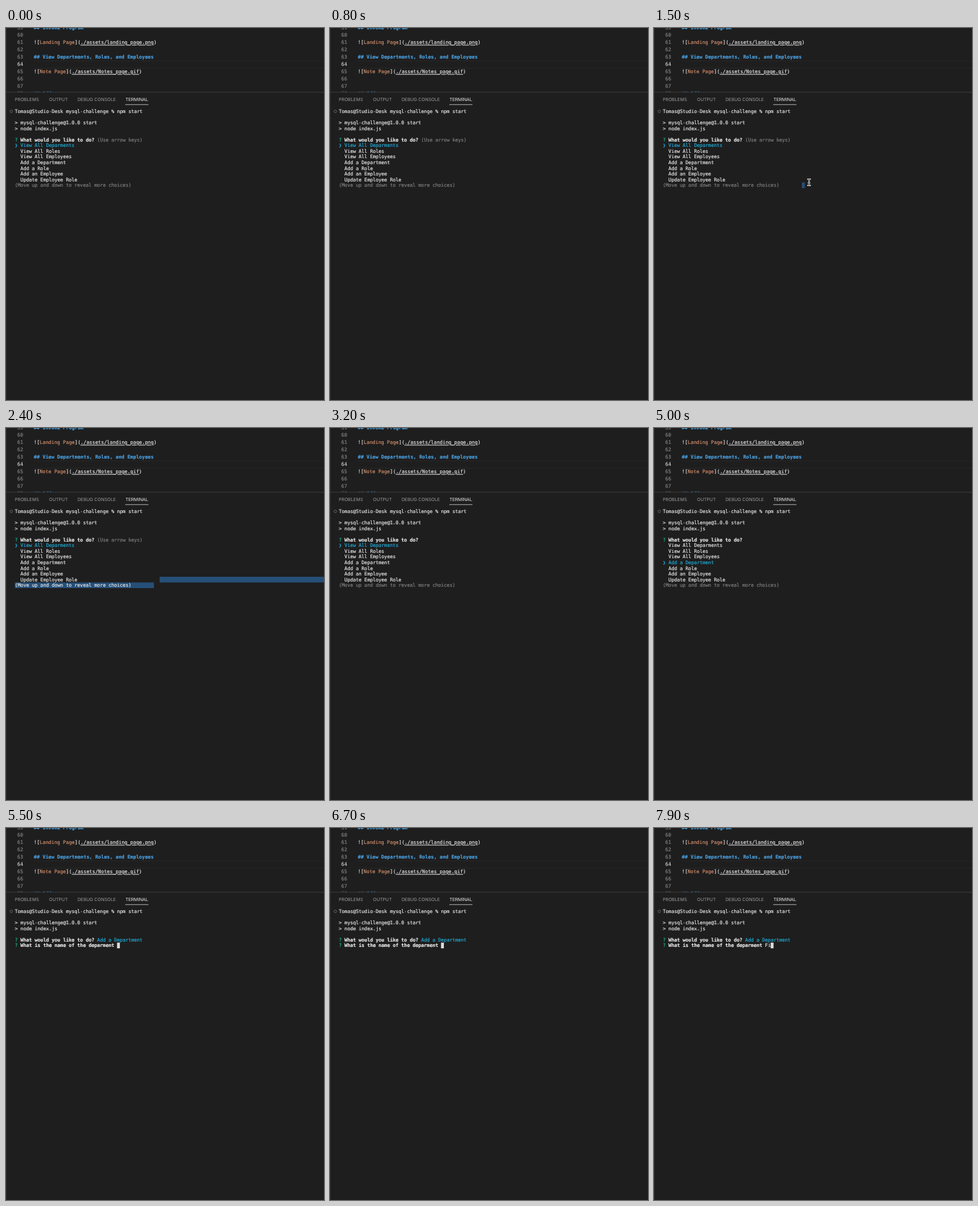
An HTML page that plays this animation: 480x560 px, repeating every 8 s.

```html
<!DOCTYPE html>
<html lang="en">
<head>
<meta charset="utf-8">
<title>Terminal menu</title>
<style>
  html, body { margin: 0; width: 100%; height: 100%; overflow: hidden; background: #1e1e1e; }
  svg { display: block; width: 480px; height: 560px; }
  text { color: #ececec; white-space: pre; text-rendering: geometricPrecision; }
  text, tspan { fill: currentColor; stroke: currentColor; stroke-width: .14; }
  .mono { font: 7.33px "DejaVu Sans Mono", "Liberation Mono", monospace; }
  #term { letter-spacing: -.127px; }
  #tabs { font: 6.75px Inter, Roboto, sans-serif; }
  #tabs text { color: #9b9b9b; stroke: none; }
  #tabs .on { color: #ececec; }
  .num { color: #858585; }
  .now { color: #d0d0d0; }
  .head { color: #4aa3e4; font-weight: bold; }
  .label { color: #d8916f; }
  .url { text-decoration: underline; }
  .bold { font-weight: bold; }
  .ask { color: #1fb78c; }
  .cyan { color: #20aedb; }
  .dim { color: #828282; }
  .sel { fill: #264f78; }
  .block { fill: #dedede; }
</style>
</head>
<body>
<svg viewBox="0 0 480 560">
  <defs>
    <clipPath id="pane"><path d="M0 0H480V96.5H0z"/></clipPath>
    <path id="beam" d="M-1.9 -4.7Q0 -4.7 0 -3Q0 -4.7 1.9 -4.7M0 -3V3M-1.9 4.7Q0 4.7 0 3Q0 4.7 1.9 4.7M-1 1H1"/>
  </defs>
  <rect width="480" height="560" fill="#1e1e1e"/>
  <g id="editor" class="mono" clip-path="url(#pane)">
    <path d="M42 49.7H480M42 60.5H480" stroke="#2a2a2a" stroke-width=".7"/>
  </g>
  <path d="M0 96.7H480" stroke="#424242" stroke-width=".8"/>
  <path d="M.4 0V560" stroke="#333" stroke-width=".8"/>
  <g id="tabs">
    <text x="13.3" y="110">PROBLEMS</text>
    <text x="65" y="110">OUTPUT</text>
    <text x="108" y="110">DEBUG CONSOLE</text>
    <text x="180.3" y="110" class="on">TERMINAL</text>
    <path d="M180 115.3H215" stroke="#e7e7e7" stroke-width=".7"/>
  </g>
  <circle cx="8" cy="125.5" r="2" fill="none" stroke="#777" stroke-width=".7"/>
  <g id="term" class="mono"></g>
  <g id="mouse" fill="none" stroke-linecap="round">
    <use href="#beam" stroke="#f2f2f2" stroke-width="2.1"/>
    <use href="#beam" stroke="#222" stroke-width=".7"/>
  </g>
</svg>
<script>
const LOOP = 8000;
const CELL = 4.286, ROW = 8.56, LEFT = 13.3, TOP = 121.2;
const $ = id => document.getElementById(id);
const span = (cls, s) => `<tspan class="${cls}">${s}</tspan>`;

// Editor
const link = (name, path) => `![${span('label', name)}](${span('url', path)})`;
const head = s => span('head', s);
const lines = [
  head('## Invoke Program'), '',
  link('Landing Page', './assets/landing_page.png'), '',
  head('## View Departments, Roles, and Employees'), '',
  link('Note Page', './assets/Notes_page.gif'), '', '',
  head('## Add')
];
$('editor').insertAdjacentHTML('beforeend', lines.map((s, i) => {
  const y = 2.4 + i * 11, n = 59 + i;
  return `<text x="17" y="${y}" class="${n === 64 ? 'now' : 'num'}">${n}</text>` +
         `<text x="42" y="${y}">${s}</text>`;
}).join(''));

// Terminal
const menu = ['View All Deparments', 'View All Roles', 'View All Employees',
  'Add a Department', 'Add a Role', 'Add an Employee', 'Update Employee Role'];
const colX = c => LEFT + c * CELL;
const put = (row, col, s, cls = '') =>
  `<text x="${colX(col)}" y="${TOP + row * ROW + 6.7}" class="${cls}">${s}</text>`;
const box = (row, from, to, cls) =>
  `<rect x="${colX(from)}" y="${TOP + row * ROW}" width="${(to - from) * CELL}" height="${ROW}" class="${cls}"/>`;

const prompt = put(0, 0, 'Tomas@Studio-Desk mysql-challenge % npm start') +
  put(2, 0, '&gt; mysql-challenge@1.0.0 start') + put(3, 0, '&gt; node index.js') +
  put(5, 0, '?', 'ask') + put(5, 2, 'What would you like to do?', 'bold');

function menuView(s) {
  let out = s.hint ? put(5, 29, '(Use arrow keys)', 'dim') : '';
  if (s.drag === 1) out += box(13, 49, 50, 'sel');
  if (s.drag === 2) out += box(12, 51, 110, 'sel') + box(13, 0, 49, 'sel');
  menu.forEach((item, i) => {
    const on = i === s.pick;
    if (on) out += put(6 + i, 0, '❯', 'cyan');
    out += put(6 + i, 2, item, on ? 'cyan' : '');
  });
  return out + put(13, 0, '(Move up and down to reveal more choices)', s.drag === 2 ? '' : 'dim');
}

function inputView(s) {
  const end = 36 + s.typed.length;
  return put(5, 29, menu[3], 'cyan') + put(6, 0, '?', 'ask') +
    put(6, 2, 'What is the name of the deparment', 'bold') +
    put(6, 36, s.typed) + box(6, end, end + 1, 'block');
}

const states = [
  [0, { hint: true, pick: 0 }],
  [1300, { hint: true, pick: 0, drag: 1 }],
  [1600, { hint: true, pick: 0, drag: 2 }],
  [2800, { pick: 0 }],
  [3500, { pick: 1 }],
  [4000, { pick: 2 }],
  [4400, { pick: 3 }],
  [5200, { typed: '' }],
  [7600, { typed: 'F' }],
  [7900, { typed: 'Fi' }]
];

// Pointer: time, x, y
const path = [[1000, 488, 245], [1200, 226, 239], [1400, 227, 238],
  [1500, 234, 232.3], [1600, 235, 229], [1800, 488, 226]];

function movePointer(t) {
  const i = path.findIndex(p => p[0] > t);
  $('mouse').style.display = i > 0 ? '' : 'none';
  if (i < 1) return;
  const [a, b] = [path[i - 1], path[i]];
  const k = (t - a[0]) / (b[0] - a[0]);
  const mix = n => a[n] + (b[n] - a[n]) * k;
  $('mouse').setAttribute('transform', `translate(${mix(1)} ${mix(2)})`);
}

let shown = null;
function draw(t) {
  const s = states.filter(e => e[0] <= t).pop()[1];
  if (s !== shown) {
    $('term').innerHTML = prompt + ('typed' in s ? inputView(s) : menuView(s));
    shown = s;
  }
  movePointer(t);
}

const start = performance.now();
function tick() {
  draw((performance.now() - start) % LOOP);
  requestAnimationFrame(tick);
}
tick();
</script>
</body>
</html>
```
